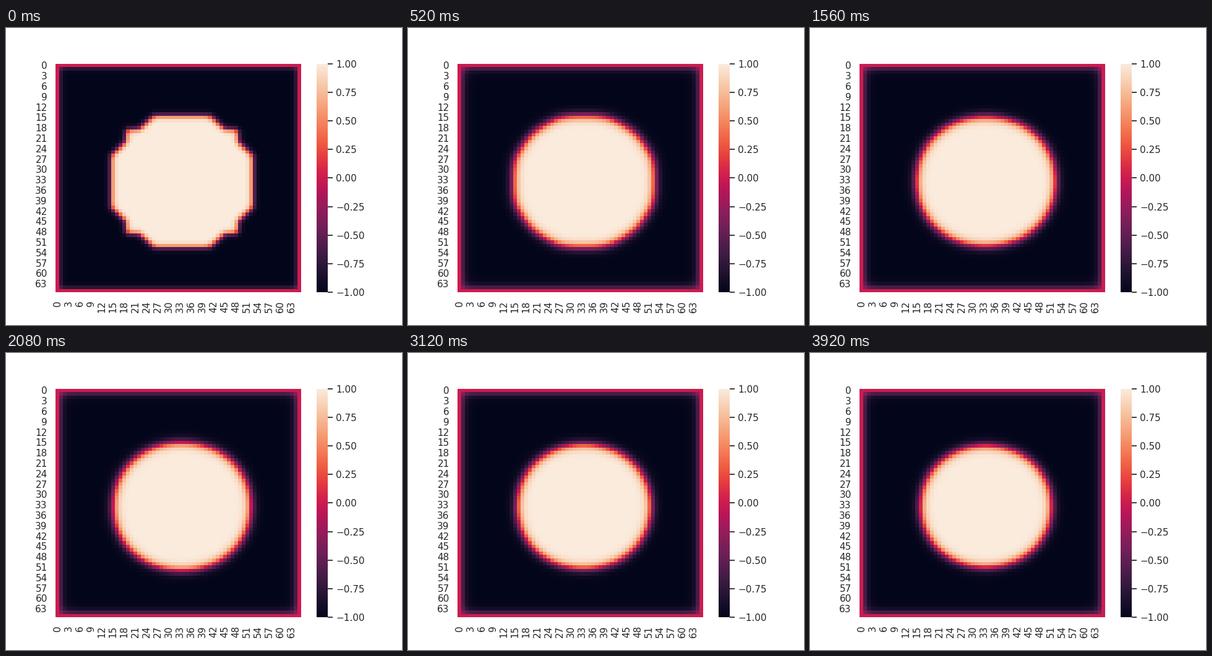
These frames come from a looping animation (640x480 px, 4 s). A matplotlib script:

```python
import matplotlib.pyplot as plt
import numpy as np
from matplotlib.animation import FuncAnimation
from matplotlib.colors import LinearSegmentedColormap

N = 66              # grid cells per side, border included
FRAMES = 100
INTERVAL = 40       # ms
DIFFUSION = 0.38    # cells^2 per frame
EPS = 1.0           # interface width in cells
SUBSTEPS = 10

INK = "#262626"
plt.rcParams.update({
    "font.family": "DejaVu Sans",
    "xtick.labelsize": 11, "ytick.labelsize": 11,
    "xtick.color": INK, "ytick.color": INK,
    "xtick.major.size": 6, "ytick.major.size": 6,
    "xtick.major.width": 1.25, "ytick.major.width": 1.25,
    "xtick.bottom": False, "ytick.left": False,
})


def make_cmap():
    twelfths = ["#03051A", "#221331", "#451C47", "#6A1F56", "#921C5B",
                "#B91657", "#D92847", "#ED513E", "#F47C56", "#F6A47B",
                "#F7C9AA", "#FAEBDD"]
    between = ["#35193E", "#701F57", "#AD1759", "#E13342", "#F37651",
               "#F6B48F"]
    stops = [(i / 11, c) for i, c in enumerate(twelfths)]
    stops += [(i / 7, c) for i, c in enumerate(between, 1)]
    stops.append((0.5, "#CB1B4F"))
    return LinearSegmentedColormap.from_list("rocket", sorted(stops), N=256)


def start_field():
    """+1 inside a clipped diamond joined with a square, -1 outside, 0 on the rim."""
    d = np.abs(np.arange(N) - 33.5)
    x, y = np.meshgrid(d, d)
    far = np.maximum(x, y)
    inside = (far < 15) | ((x + y <= 26) & (far < 19))
    u = np.where(inside, 1.0, -1.0)
    u[[0, -1], :] = 0
    u[:, [0, -1]] = 0
    return u


def evolve(u):
    """Advance the Allen-Cahn equation by one frame."""
    u = u.copy()
    dt = DIFFUSION / SUBSTEPS
    for _ in range(SUBSTEPS):
        c = u[1:-1, 1:-1]
        lap = (u[:-2, 1:-1] + u[2:, 1:-1] + u[1:-1, :-2] + u[1:-1, 2:]
               - 4 * c)
        u[1:-1, 1:-1] = c + dt * (lap + (c - c**3) / EPS**2)
    return u


fields = [evolve(start_field())]
while len(fields) < FRAMES:
    fields.append(evolve(fields[-1]))

fig, ax = plt.subplots(figsize=(6.4, 4.8), dpi=100)
mesh = ax.pcolormesh(fields[0], cmap=make_cmap(), vmin=-1, vmax=1)
ax.set(xlim=(0, N), ylim=(N, 0))
ax.spines[:].set_visible(False)

cells = np.arange(0, N, 3)
ax.set_xticks(cells + 0.5, cells, rotation=90)
ax.set_yticks(cells + 0.5, cells)

bar = fig.colorbar(mesh, ax=ax, ticks=np.linspace(-1, 1, 9))
bar.outline.set_linewidth(0)


def draw(i):
    mesh.set_array(fields[i])
    return [mesh]


anim = FuncAnimation(fig, draw, frames=FRAMES, interval=INTERVAL,
                     repeat=True, repeat_delay=0)
plt.show()
```
